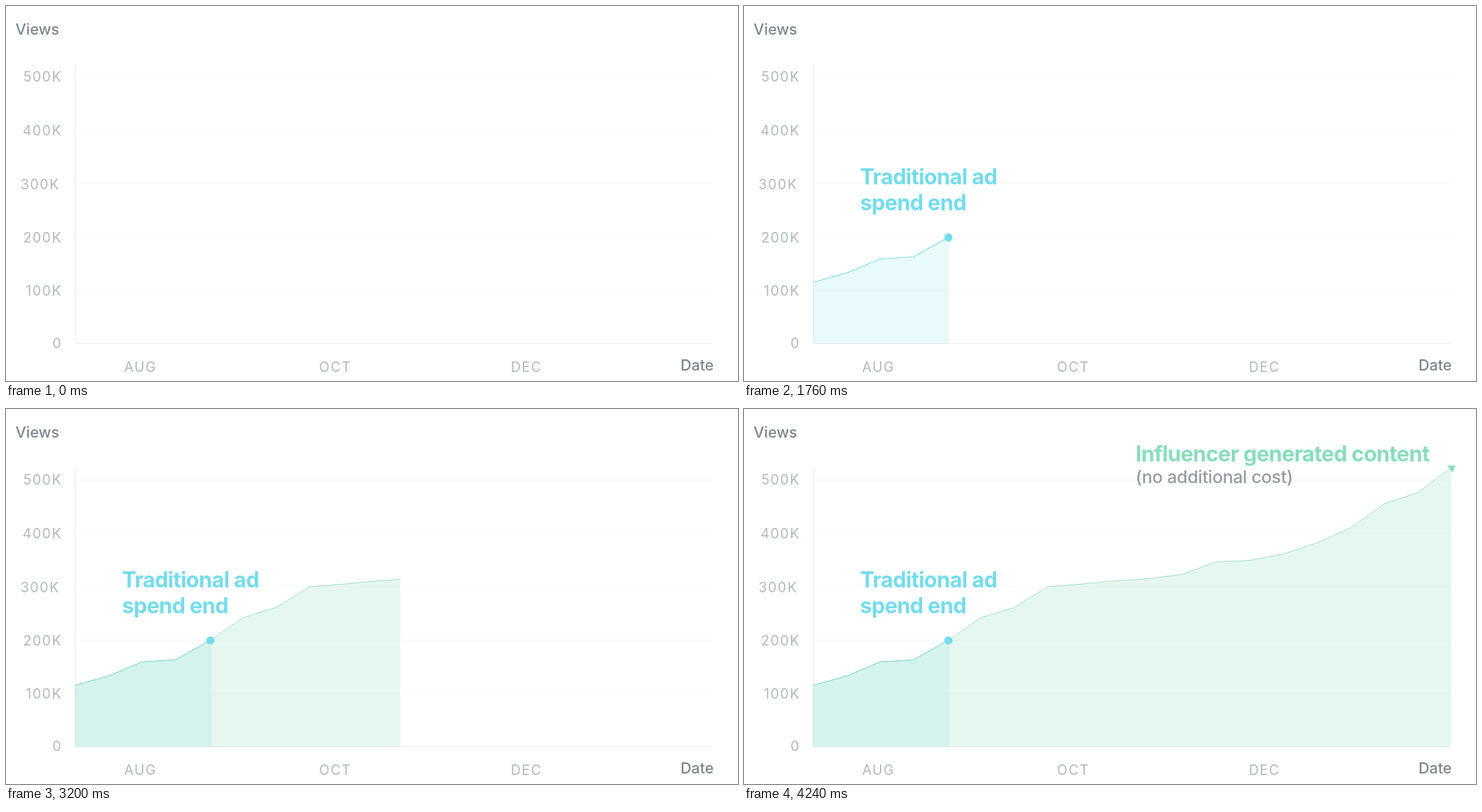
These frames come from a looping animation (1044x536 px, 6720 ms). An HTML page:

```html
<!DOCTYPE html>
<html lang="en">
<head>
<meta charset="utf-8">
<title>Views over time</title>
<style>
  html, body { margin: 0; width: 100%; height: 100%; overflow: hidden; background: #fff; }
  svg { display: block; width: 100%; height: 100%; font-family: Inter, "Open Sans", sans-serif; }
  .grid { stroke: #f6f7f8; }
  .axis { stroke: #e8ebec; fill: none; }
  .tick { font-size: 19.5px; letter-spacing: 1.5px; fill: #afb9c1; }
  .right { text-anchor: end; }
  .title { font-size: 21.5px; font-weight: 500; fill: #7c868e; }
  .head { font-size: 30.6px; font-weight: 700; letter-spacing: -.6px; }
  .note { font-size: 24.9px; font-weight: 500; letter-spacing: -.25px; fill: #959ca3; }
  .blue { fill: #74dcec; }
  .green { fill: #88deba; }
  .blue-area { fill: rgb(116, 220, 236); fill-opacity: .16; }
  .green-area { fill: rgb(130, 215, 175); fill-opacity: .2; }
  .line { fill: none; }
</style>
</head>
<body>
<svg viewBox="0 0 1044 536">
  <defs>
    <clipPath id="blueClip"><rect id="blueRect" x="98" y="60" height="430"/></clipPath>
    <clipPath id="greenClip"><rect id="greenRect" x="98" y="60" height="430"/></clipPath>
  </defs>

  <g id="scale"></g>
  <path class="axis" d="M99.5 83V482.5H1008"/>
  <text class="title" x="13.5" y="41">Views</text>
  <text class="title" x="962" y="520.5">Date</text>
  <text class="tick" x="168.5" y="523">AUG</text>
  <text class="tick" x="446.5" y="523">OCT</text>
  <text class="tick" x="720" y="523">DEC</text>

  <g clip-path="url(#blueClip)">
    <path class="blue-area area"/>
    <path class="line" stroke="#74dcec" stroke-width="1.1"/>
  </g>
  <g clip-path="url(#greenClip)">
    <path class="green-area area"/>
    <path class="line" stroke="#98dfc1" stroke-width=".9"/>
  </g>

  <g id="adText" class="head blue">
    <text x="165.5" y="255">Traditional ad</text>
    <text x="165.5" y="292">spend end</text>
  </g>
  <circle id="dot" class="blue" r="5.8"/>

  <g id="contentText">
    <text class="head green" x="558.5" y="75">Influencer generated content</text>
    <text class="note" x="558.5" y="106">(no additional cost)</text>
  </g>
  <path id="tip" class="green" d="M-6 -4L5.5 -4.5L1.5 6Z"/>
</svg>
<script>
  const LOOP = 6720, STEP = 80;
  const LEFT = 98.5, BASE = 482.5;
  const $ = id => document.getElementById(id);

  // Gridlines and value labels
  const labelY = [488.5, 413.5, 337.5, 261.5, 185, 107.5];
  const gridY = [0, 406.5, 330.5, 253.5, 177.5, 101.5];
  $('scale').innerHTML = labelY.map((y, i) => {
    const line = i ? `<path class="grid" d="M100 ${gridY[i]}H1008"/>` : '';
    const x = i === 3 ? 76.5 : 80;
    return `${line}<text class="tick right" x="${x}" y="${y}">${i ? i + '00K' : 0}</text>`;
  }).join('');

  // Curve shared by both phases
  const curve = 'M' + [
    [LEFT, 395], [148, 381], [194, 361.5], [242, 358.5], [291.5, 330.5],
    [338, 298.3], [386, 283.5], [433, 254], [480, 250.3], [528, 245.8],
    [579, 242.3], [625, 236.3], [673, 218.5], [721, 216.5], [770, 207],
    [817, 191.5], [865, 170], [914, 135], [961, 119.5], [1008.5, 84]
  ].join('L');
  const setPath = (selector, d) =>
    document.querySelectorAll(selector).forEach(p => p.setAttribute('d', d));
  setPath('.line', curve);
  setPath('.area', `${curve}V${BASE}H${LEFT}Z`);

  const progress = (t, from, to) => Math.min(1, Math.max(0, (t - from) / (to - from)));
  const sine = u => .5 - .5 * Math.cos(Math.PI * u);
  const reveal = (id, width) => $(id).setAttribute('width', width);
  const fade = (id, u) => $(id).setAttribute('opacity', u);
  const pop = (id, x, y, u) =>
    $(id).setAttribute('transform', `translate(${x} ${y}) scale(${u})`);

  function draw(now) {
    // The motion advances in 80 ms ticks
    const t = Math.floor(now % LOOP / STEP) * STEP;
    const blue = sine(progress(t, 38, 1478));
    reveal('blueRect', t < 160 ? 0 : 1 + 194 * blue);
    fade('adText', progress(t, 1280, 1520));
    pop('dot', 291.5, 330.8, progress(t, 1520, 1760));
    reveal('greenRect', 911 * progress(t, 2516, 3858));
    pop('tip', 1009, 85, progress(t, 3840, 4000));
    fade('contentText', progress(t, 3920, 4240));
  }

  function tick(now) {
    draw(now);
    requestAnimationFrame(tick);
  }
  draw(0);
  requestAnimationFrame(tick);
</script>
</body>
</html>
```
